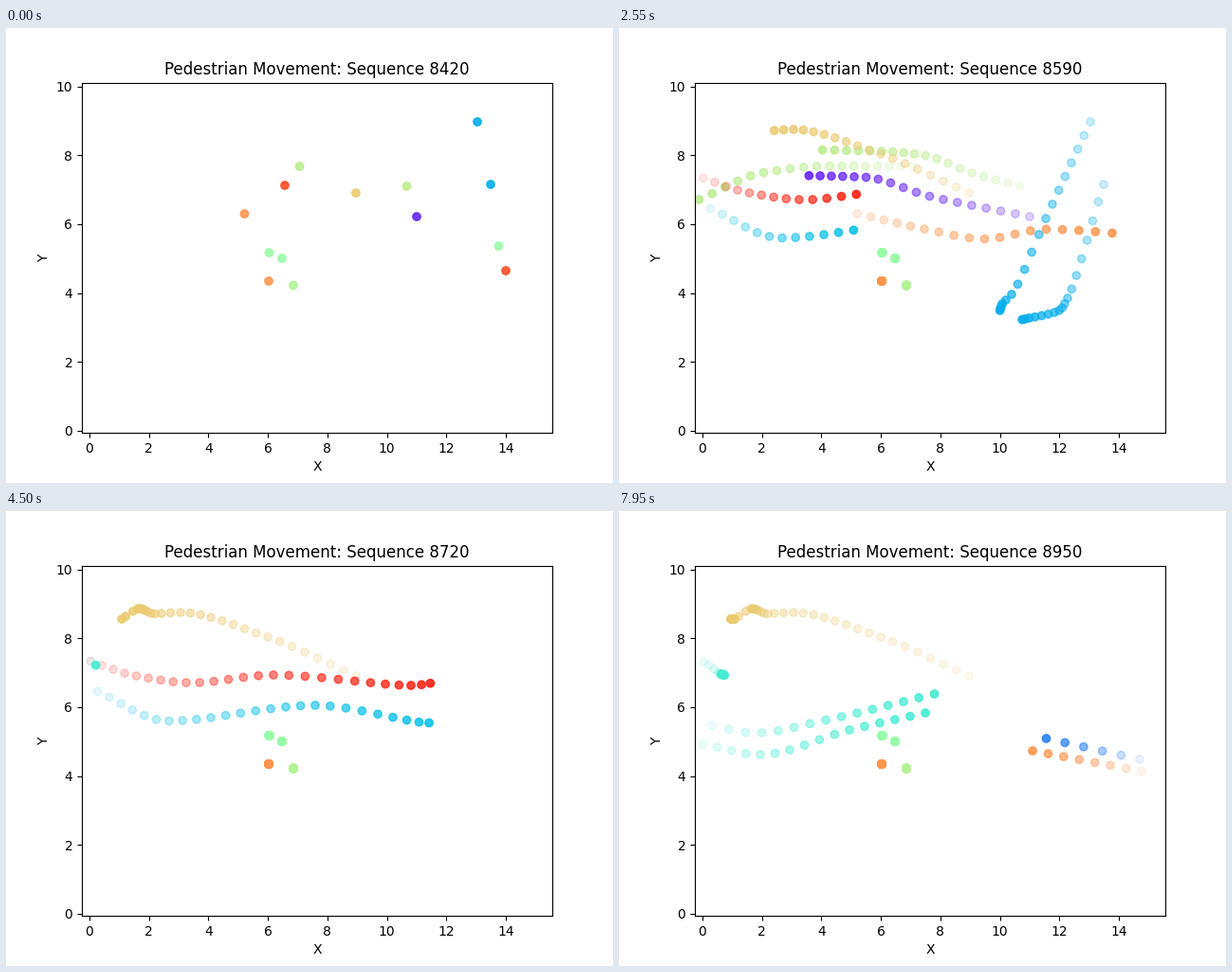
Animation of 640x480 px, one loop 8 s. Source, as a matplotlib script:

```python
import matplotlib.pyplot as plt
import numpy as np
from matplotlib.animation import FuncAnimation

INTERVAL = 50
FRAMES = 160
FRAMES_PER_STEP = 3
LAST_STEP = (FRAMES - 1) // FRAMES_PER_STEP
FIRST_SEQUENCE = 8420
XLIM, YLIM = (-0.25, 15.56), (-0.067, 10.113)
LEFT, RIGHT, TOP, BOTTOM = 80, 576, 57.6, 427.2
FAINT, STRONG = 0.1, 0.9

rainbow = plt.get_cmap("rainbow")
walkers = []


def to_data(x, y):
    """Convert stage pixels (y down) to axes units."""
    across = (x - LEFT) / (RIGHT - LEFT)
    up = (BOTTOM - y) / (BOTTOM - TOP)
    return np.column_stack([XLIM[0] + across * np.ptp(XLIM),
                            YLIM[0] + up * np.ptp(YLIM)])


def glide(t, knots, values):
    """Cubic curve through the knots that never overshoots them."""
    secants = np.diff(values) / np.diff(knots)
    a, b = secants[:-1], secants[1:]
    same_way = a * b > 0
    inner = np.where(same_way, 2 * a * b / np.where(same_way, a + b, 1), 0)
    slopes = np.concatenate([secants[:1], inner, secants[-1:]])
    i = np.clip(np.searchsorted(knots, t, side="right") - 1, 0, len(knots) - 2)
    h = knots[i + 1] - knots[i]
    u = (t - knots[i]) / h
    return ((1 + 2 * u) * (1 - u) ** 2 * values[i] + u * (1 - u) ** 2 * h * slopes[i]
            + u * u * (3 - 2 * u) * values[i + 1] + u * u * (u - 1) * h * slopes[i + 1])


def walk(hue, earlier, *waypoints):
    """Add a walker from (step, x, y) waypoints; `earlier` counts unseen steps."""
    knots, x, y = np.array(waypoints, float).T
    steps = np.arange(int(knots[0]), int(knots[-1]) + 1)
    path = to_data(glide(steps, knots, x), glide(steps, knots, y))
    walkers.append((steps, path, rainbow(hue)[:3], earlier))


def stand(hue, x, y):
    walk(hue, 3, (0, x, y), (LAST_STEP, x, y))


PURPLE, AZURE, BLUE, CYAN, TEAL = 0.05, 0.17, 0.24, 0.275, 0.38
GREEN, LIME, YELLOW, ORANGE, CORAL, RED = 0.55, 0.62, 0.71, 0.8, 0.9, 0.96

# People already on the scene
walk(PURPLE, 3, (0, 433, 199), (7, 327.5, 177.5), (12, 260.5, 157.5),
     (20, 164.5, 154.5), (25, 102, 143.5))
walk(BLUE, 3, (0, 497, 99), (7, 450, 201), (12, 414, 281), (14, 404, 291),
     (19, 400, 304), (22, 392, 343), (27, 376, 424))
walk(BLUE, 3, (0, 511, 165), (7, 473, 285), (10, 464, 298), (16, 428, 307),
     (19, 421, 309), (22, 416, 340), (27, 408, 417))
stand(GREEN, 277.5, 237)
stand(GREEN, 291, 243)
stand(0.6, 303, 271.5)
walk(LIME, 1, (0, 309.5, 146), (7, 222, 145.5), (12, 152.5, 152.5), (17, 84.5, 181))
walk(LIME, 1, (0, 422.5, 167), (4, 372, 153), (8, 323, 134.5), (12, 277, 130),
     (27, 85, 127))
walk(YELLOW, 2, (0, 369, 174), (7, 276, 133), (15, 184, 107), (18, 157, 108.5),
     (22, 145, 104), (27, 139, 103), (30, 122, 114), (LAST_STEP, 118, 114))
walk(ORANGE, 2, (0, 251.5, 196), (5, 322, 212), (9, 385.5, 222.5),
     (13, 450.5, 212.3), (20, 573, 221))
stand(ORANGE, 277, 267)
walk(CORAL, 4, (0, 294, 166), (7, 177, 133), (13, 82, 112))
walk(GREEN, 3, (0, 519.5, 230), (2, 555, 229))
walk(CORAL, 3, (0, 527, 256), (2, 565, 256))

# Later arrivals
walk(RED, 0, (5, 89, 158.5), (9, 137.5, 174), (13.5, 197, 181.2), (19, 282, 173),
     (28, 427, 184), (31, 454.5, 181), (33, 463, 188.5), (36, 499, 202),
     (40, 573, 209))
walk(CYAN, 0, (6, 96.5, 190.5), (12, 172, 221.5), (22, 326, 205), (30, 446, 223.5),
     (34, 472.5, 220), (36, 509, 231.5), (39, 562, 233))
walk(TEAL, 0, (29, 89.5, 158.7), (33, 107, 172), (LAST_STEP, 111, 173))
walk(TEAL, 0, (38, 88.5, 246), (42, 149, 257), (48, 243, 231), (LAST_STEP, 323, 213))
walk(TEAL, 0, (39, 98, 226), (41.5, 142, 234.3), (46, 218, 220.5),
     (LAST_STEP, 332.5, 193))
walk(ORANGE, 0, (46, 551, 274.5), (LAST_STEP, 436, 253))
walk(AZURE, 0, (48, 549, 262), (LAST_STEP, 450.5, 240))

fig, ax = plt.subplots(figsize=(6.4, 4.8), dpi=100)
ax.set(xlim=XLIM, ylim=YLIM, xlabel="X", ylabel="Y")
ax.set_xticks(range(0, 15, 2))
ax.set_yticks(range(0, 11, 2))
title = ax.set_title("")
dots = ax.scatter([], [])


def draw(frame):
    step = frame // FRAMES_PER_STEP
    points, colors = [], []
    for steps, path, rgb, earlier in walkers:
        if not steps[0] <= step <= steps[-1]:
            continue
        count = step - steps[0] + 1
        # Trails fade from the newest position back to the oldest.
        alphas = np.linspace(FAINT, STRONG, count + earlier)[earlier:]
        points.append(path[:count])
        colors.append(np.column_stack([np.tile(rgb, (count, 1)), alphas]))
    dots.set_offsets(np.vstack(points))
    dots.set_color(np.vstack(colors))
    title.set_text(f"Pedestrian Movement: Sequence {FIRST_SEQUENCE + 10 * step}")
    return dots, title


anim = FuncAnimation(fig, draw, frames=FRAMES, interval=INTERVAL, repeat=True,
                     repeat_delay=0, blit=False)
plt.show()
```
